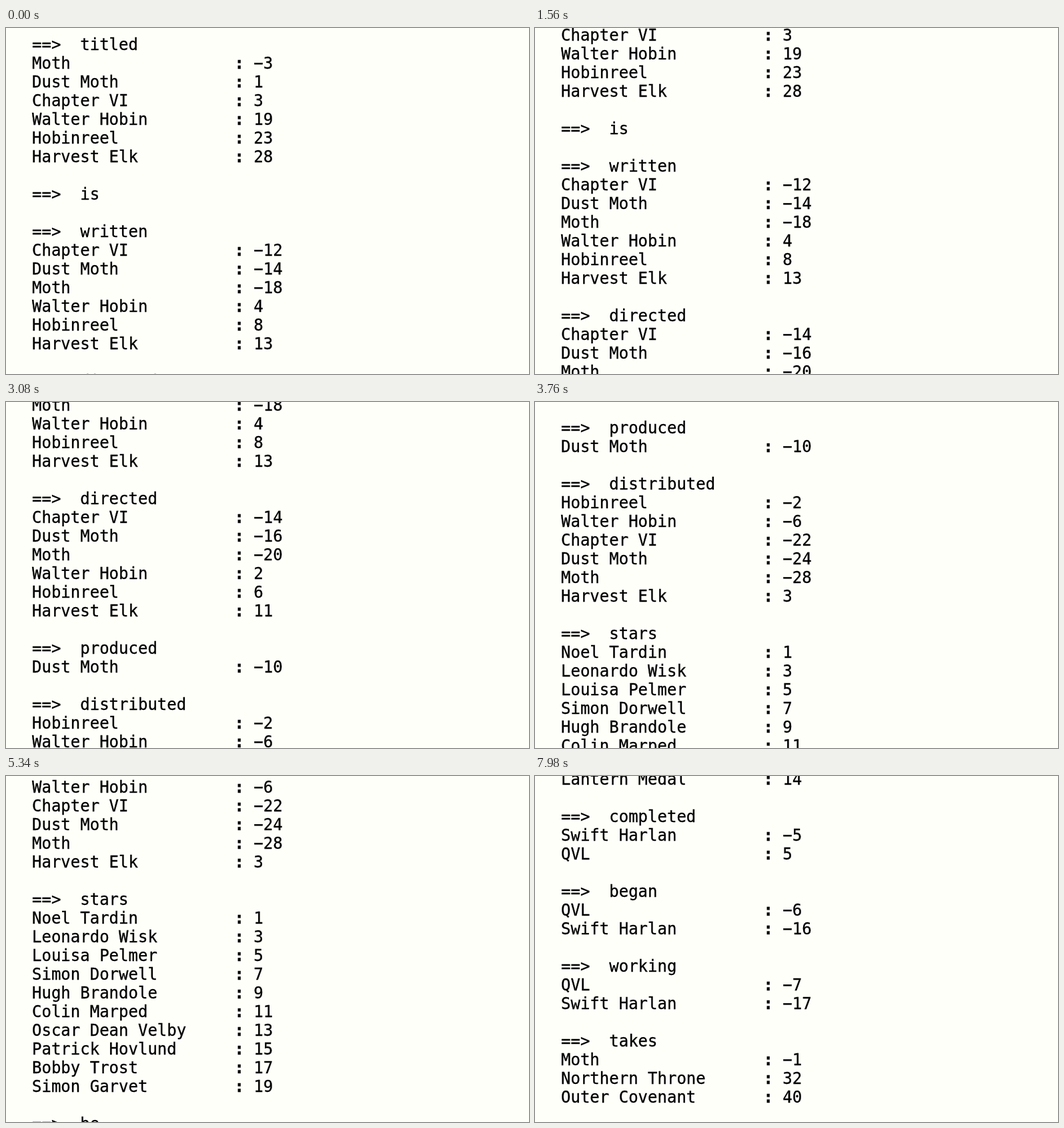
An HTML page for the animation above (8 s loop, 784x518 px).

```html
<!DOCTYPE html>
<html lang="en">
<head>
<meta charset="utf-8">
<title>Scrolling terminal output</title>
<style>
  html, body { margin: 0; width: 100%; height: 100%; overflow: hidden; background: #fffffa; }
  #stage { position: relative; width: 100%; height: 100%; overflow: hidden; contain: strict; }
  #log {
    position: absolute; left: 39px; top: 11px; margin: 0;
    font: 24px/28px "DejaVu Sans Mono", monospace;
    color: #000; white-space: pre; font-variant-ligatures: none;
    -webkit-text-stroke: 0.3px #000;
  }
</style>
</head>
<body>
<div id="stage"><pre id="log"></pre></div>
<script>
const sections = `
titled
Moth -3
Dust Moth 1
Chapter VI 3
Walter Hobin 19
Hobinreel 23
Harvest Elk 28

is

written
Chapter VI -12
Dust Moth -14
Moth -18
Walter Hobin 4
Hobinreel 8
Harvest Elk 13

directed
Chapter VI -14
Dust Moth -16
Moth -20
Walter Hobin 2
Hobinreel 6
Harvest Elk 11

produced
Dust Moth -10

distributed
Hobinreel -2
Walter Hobin -6
Chapter VI -22
Dust Moth -24
Moth -28
Harvest Elk 3

stars
Noel Tardin 1
Leonardo Wisk 3
Louisa Pelmer 5
Simon Dorwell 7
Hugh Brandole 9
Colin Marped 11
Oscar Dean Velby 13
Patrick Hovlund 15
Bobby Trost 17
Simon Garvet 19

be
Dust Moth -9

had
Krandhelm 3
Lantern Medal 14

completed
Swift Harlan -5
QVL 5

began
QVL -6
Swift Harlan -16

working
QVL -7
Swift Harlan -17

takes
Moth -1
Northern Throne 32
Outer Covenant 40`;

function formatLine(line) {
  const row = line.match(/^(.+) (-?\d+)$/);
  if (row) return row[1].padEnd(21) + "<b>:</b> " + row[2].replace("-", "\u2212");
  return line && "==&gt;  " + line;
}

const log = document.getElementById("log");
log.innerHTML = sections.trim().split("\n").map(formatLine).join("\n");

const LOOP = 8000;
const RISE = 10.92;  // steps a flick takes to reach its peak speed
const DECAY = 9.8;   // time constant of the glide after it, in steps
const flicks = [
  { peak: -25, speed: 20.24 },
  { peak: 66, speed: 20.24 },
  { peak: 147.35, speed: 18.82 }
];

// The view advances three times per 140 ms: holds of 20, 20 and 100 ms.
function stepAt(time) {
  const shifted = time + 20;
  const phase = shifted % 140;
  return Math.floor(shifted / 140) * 3 + (phase < 20 ? 0 : phase < 40 ? 1 : 2) - 1;
}

function flickTravel({ peak, speed }, step) {
  const x = step - peak;
  if (x < 0) return speed * Math.max(0, x + RISE) ** 2 / (2 * RISE);
  return speed * (RISE / 2 + DECAY * (1 - Math.exp(-x / DECAY)));
}

// A steady drift plus the flicks, in points of two pixels
const travel = step => flicks.reduce((sum, flick) => sum + flickTravel(flick, step), step);
const scrollAt = step => 2 * Math.round(travel(step) - travel(0));

const start = performance.now();
function draw() {
  const time = (performance.now() - start) % LOOP;
  log.style.top = 11 - scrollAt(stepAt(time)) + "px";
  requestAnimationFrame(draw);
}
draw();
</script>
</body>
</html>
```
